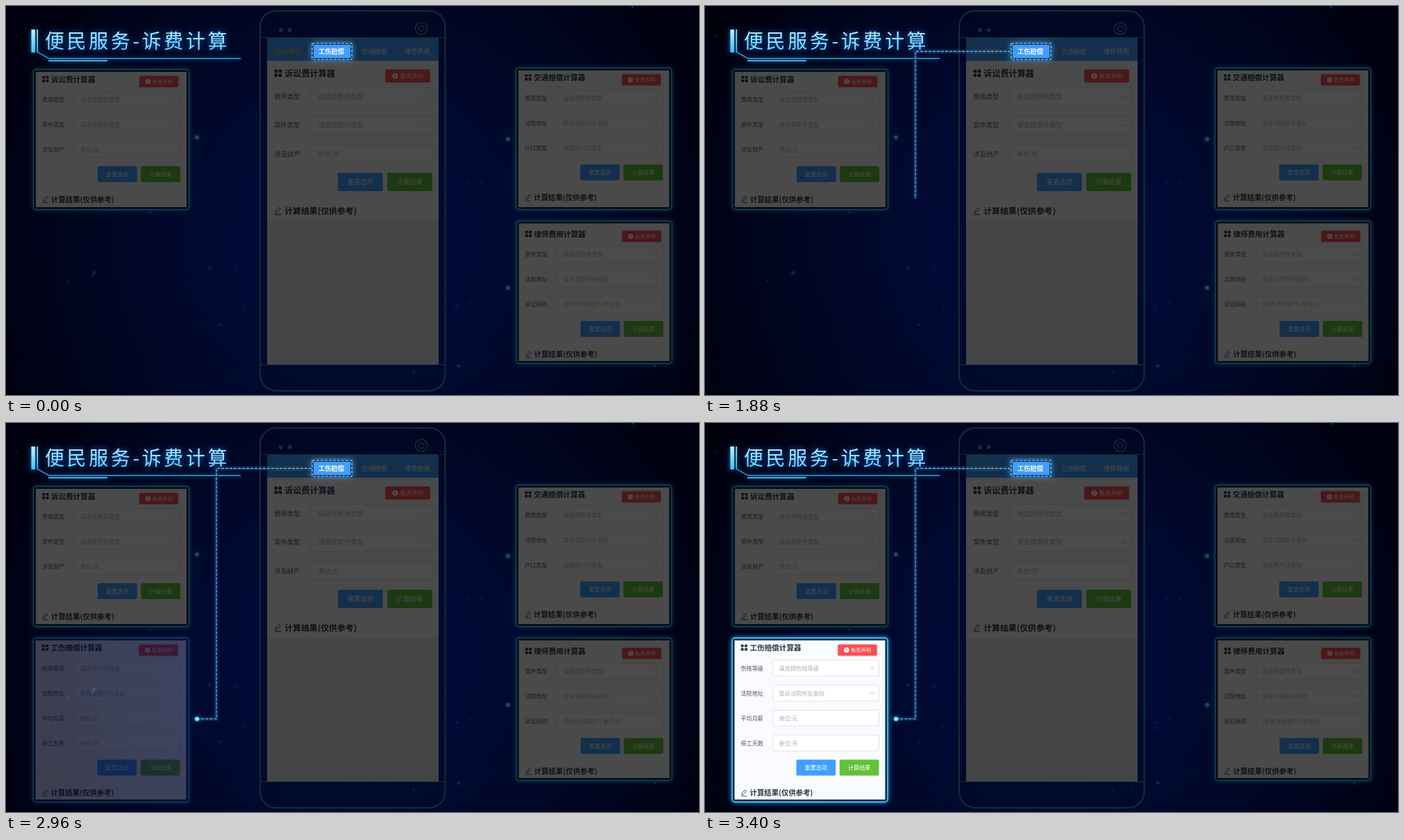
Animation of 998 by 561 pixels, one loop 4000 ms. Source, as an HTML page with a canvas:

```html
<!DOCTYPE html>
<html lang="zh-CN">
<head>
<meta charset="utf-8">
<style>
html, body { margin: 0; width: 100%; height: 100%; overflow: hidden; background: #00020f; }
canvas { display: block; }
</style>
</head>
<body>
<canvas id="stage" width="998" height="561"></canvas>
<script>
const W = 998, H = 561, LOOP = 4000, STEP = 40, SHADE = .707;
const FONT = '"Noto Sans CJK SC", "Noto Sans CJK", "Noto Sans", sans-serif';
const INK = '#303540', LABEL = '#50545c', HINT = '#a9adb6', WHITE = '#ffffff';
const PAGE = '#fafbff', EDGE = '#dcdfe6', RED = '#ff4d4f', BLUE = '#409eff', GREEN = '#62c238';

const stage = document.getElementById('stage').getContext('2d');
let c;

function layer(draw) {
  const canvas = document.createElement('canvas');
  canvas.width = W;
  canvas.height = H;
  c = canvas.getContext('2d');
  draw();
  return canvas;
}

function text(str, x, y, size, color, weight = 400, align = 'left') {
  c.font = `${weight} ${size}px ${FONT}`;
  c.textAlign = align;
  c.textBaseline = 'middle';
  c.fillStyle = color;
  c.fillText(str, x, y);
}

function box(x, y, w, h, r, fill, stroke, width = 1) {
  c.beginPath();
  c.roundRect(x, y, w, h, r);
  if (fill) { c.fillStyle = fill; c.fill(); }
  if (stroke) { c.strokeStyle = stroke; c.lineWidth = width; c.stroke(); }
}

function line(points, color, width) {
  c.beginPath();
  points.forEach(p => c.lineTo(...p));
  c.strokeStyle = color;
  c.lineWidth = width;
  c.stroke();
}

function disc(x, y, r, fill) {
  c.beginPath();
  c.arc(x, y, r, 0, 7);
  c.fillStyle = fill;
  c.fill();
}

function ring(x, y, r, color) {
  c.beginPath();
  c.arc(x, y, r, 0, 7);
  c.strokeStyle = color;
  c.lineWidth = 1.5;
  c.stroke();
}

function glow(color, blur, draw) {
  c.save();
  c.shadowColor = color;
  c.shadowBlur = blur;
  draw();
  c.restore();
}

// Form of one calculator; x is its left side, y the middle of its heading.
function form(x, y, title, rows, scale = 1) {
  c.save();
  c.translate(x, y);
  c.scale(scale, scale);
  for (const dx of [9.3, 14.6]) for (const dy of [-4.6, 0.6]) box(dx, dy, 3.9, 3.9, .7, INK);
  text(title, 22, 0, 10.6, INK, 700);

  glow('rgba(0,0,0,.3)', 3, () => box(149, -4.5, 56, 16, 1.5, RED));
  disc(161.3, 3.5, 3.8, WHITE);
  box(160.8, 1.2, 1, 2.8, 0, RED);
  box(160.8, 4.8, 1, 1, 0, RED);
  text('免责声明', 167.5, 3.6, 7.3, WHITE, 500);

  rows.forEach(([label, hint], i) => {
    const ry = 29.5 + i * 36;
    text(label, 9, ry, 8.1, LABEL);
    box(55, ry - 11.5, 153, 23, 2, WHITE, EDGE, .9);
    text(hint, 64, ry, 8.2, HINT);
    if (!hint.includes('单位')) line([[195, ry - 1.5], [198, ry + 1.7], [201, ry - 1.5]], HINT, .8);
  });

  const by = 29 + rows.length * 36;
  box(89, by - 11.5, 56.7, 23, 2, BLUE);
  box(151.3, by - 11.5, 56.7, 23, 2, GREEN);
  text('重置选项', 117.3, by, 8.1, WHITE, 500, 'center');
  text('计算结果', 179.7, by, 8.1, WHITE, 500, 'center');

  const ey = by + 36.5;
  line([[10.4, ey + 3], [11, ey + .3], [15, ey - 4.4], [17, ey - 2.7], [13, ey + 2], [10.4, ey + 3]], INK, .8);
  line([[9.4, ey + 4.6], [17.6, ey + 4.6]], INK, .8);
  text('计算结果(仅供参考)', 22, ey, 10.4, INK, 700);
  c.restore();
}

function card(x, top, bottom, y, title, rows) {
  glow('#18a8ff', 6, () => box(x - 3.5, top, 224, bottom - top, 4, '#04173a', '#62dcf8', 1.4));
  box(x, top + 3.5, 217, bottom - top - 7, 0, PAGE);
  form(x, y, title, rows);
}

function backdrop() {
  const g = c.createRadialGradient(499, 340, 0, 499, 340, 560);
  g.addColorStop(0, '#020d42');
  g.addColorStop(.5, '#01082b');
  g.addColorStop(1, '#00010f');
  c.fillStyle = g;
  c.fillRect(0, 0, W, H);

  c.setLineDash([1, 2]);
  for (let i = 0; i < 14; i++) {
    const wave = [];
    for (let x = 0; x <= W; x += 6) {
      wave.push([x, 515 + i * 5 - 38 * Math.sin((x - 560) / 210 + i * .07) * (x / W)]);
    }
    line(wave, 'rgba(30,90,190,.08)', 1);
  }
  c.setLineDash([]);

  const sparks = [[127, 384, 2], [125, 388, 1.2], [90, 397, 1.2], [293, 378, 1.5], [308, 460, 1.3], [207, 298, 1.2],
    [649, 432, 1.2], [668, 427, 1], [648, 441, 1], [652, 519, 2], [587, 529, 1.5], [615, 529, 1], [902, 1, 1.5],
    [935, 519, 1.5], [684, 254, 1], [664, 254, 1], [330, 380, 1], [343, 437, 1], [15, 43, 1]];
  for (const [x, y, r] of sparks) glow('#0c3f9a', 4, () => disc(x, y, r * .8, '#0e3a7c'));
}

function heading() {
  const bar = c.createLinearGradient(0, 34, 0, 67);
  bar.addColorStop(0, '#c4f8ff');
  bar.addColorStop(1, '#45c0ea');
  glow('#1684e0', 6, () => {
    box(36.5, 34, 5.5, 33, 0, bar);
    box(44.5, 34, 1.5, 33, 0, bar);
    line([[45.5, 66.5], [62, 75.7], [338, 75.7]], '#42b9e2', 1.3);
    line([[61, 78.8], [146, 78.8]], '#48c4ec', 1.8);
  });
  const ink = c.createLinearGradient(0, 36, 0, 64);
  ink.addColorStop(0, '#b4f8ff');
  ink.addColorStop(1, '#66d6ff');
  c.letterSpacing = '3.6px';
  glow('#1672ee', 9, () => text('便民服务-诉费计算', 56, 50, 28, ink, 500));
  c.letterSpacing = '0px';
}

function phone() {
  const edge = '#3f9fae';
  box(366, 7, 266.5, 548, 23, 'rgba(4,30,110,.3)', edge, 2);
  disc(396, 35, 3, edge);
  disc(408.5, 35, 3, edge);
  ring(598, 32.5, 8.7, edge);
  ring(598, 32.5, 4, edge);
  line([[366, 45.5], [632, 45.5]], edge, 1);
  line([[366, 517.5], [632, 517.5]], edge, 1);
  box(376, 46, 247, 33, 0, BLUE);
  box(376, 79, 247, 231, 0, PAGE);
  box(376, 310, 247, 207, 0, '#e7e9ec');
  ['诉讼费用', '', '交通赔偿', '律师费用'].forEach((name, i) =>
    text(name, 406.5 + i * 62, 65.5, 9.3, i ? WHITE : '#ffb638', 400, 'center'));
  form(376, 97, '诉讼费计算器', feeRows, 1.144);
}

function activeTab() {
  glow('#3fa4ff', 9, () => box(440.5, 53.5, 58, 24, 0, '#173e68'));
  box(443, 56, 53, 19, 0, BLUE);
  c.setLineDash([4, 2]);
  box(441, 54, 57, 23, 0, null, '#a4d4ea', 1.2);
  c.setLineDash([]);
  text('工伤赔偿', 468.5, 65.7, 9.3, WHITE, 700, 'center');
}

function port(x, y) {
  glow('#20c8ff', 6, () => disc(x, y, 3, '#6df2ff'));
}

const feeRows = [['费用类型', '请选择费用类型'], ['案件类型', '请选择案件类型'], ['涉及财产', '单位:元']];
const court = ['法院地址', '受诉法院所在省份'];

const shaded = layer(() => {
  phone();
  card(43, 91.5, 293.5, 105.5, '诉讼费计算器', feeRows);
  card(738, 89.5, 293.5, 103, '交通赔偿计算器',
    [['费用类型', '请选择费用类型'], court, ['户口类型', '请选择户口类型']]);
  card(738.5, 310, 515.5, 328.7, '律师费用计算器',
    [['案件类型', '请选择案件类型'], court, ['诉讼标的', '(案件涉及财产) 单位:元']]);
  for (const [x, y] of [[275, 189.5], [723, 192], [723, 406.5]]) port(x, y);
  c.globalCompositeOperation = 'source-atop';
  c.fillStyle = `rgba(0,0,0,${SHADE})`;
  c.fillRect(0, 0, W, H);
});

const base = layer(() => {
  backdrop();
  c.drawImage(shaded, 0, 0);
  heading();
  activeTab();
});

const result = layer(() => card(42.5, 310, 546.5, 324, '工伤赔偿计算器',
  [['伤残等级', '请选择伤残等级'], court, ['平均月薪', '单位:元'], ['停工天数', '单位:天']]));

// Connector: corners with the time each one is reached.
const route = [[440, 65.5, 0], [303, 65.5, 1000], [303, 426.7, 2500], [275, 426.7, 2850]];

function trace(t) {
  const path = [];
  for (let i = 0; i < route.length; i++) {
    const [x, y, at] = route[i];
    if (t >= at) { path.push([x, y]); continue; }
    const [px, py, from] = route[i - 1];
    const p = (t - from) / (at - from);
    path.push([px + (x - px) * p, py + (y - py) * p]);
    break;
  }
  return path;
}

function frame(now) {
  const t = Math.floor(now % LOOP / STEP) * STEP;
  c = stage;
  c.drawImage(base, 0, 0);
  if (t > 0) {
    const path = trace(t);
    line(path, 'rgba(10,66,120,.3)', 7);
    line(path, 'rgba(14,78,132,.45)', 4);
    c.setLineDash([4, 2]);
    line(path, '#6cacc4', 1.3);
    c.setLineDash([]);
  }
  if (t >= 2840) port(275, 426.7);
  c.globalAlpha = Math.min(1, Math.max(0, (t - 2840) / 500));
  c.drawImage(result, 0, 0);
  c.globalAlpha = 1;
}

const start = performance.now();
function tick() {
  frame(performance.now() - start);
  requestAnimationFrame(tick);
}
tick();
</script>
</body>
</html>
```
